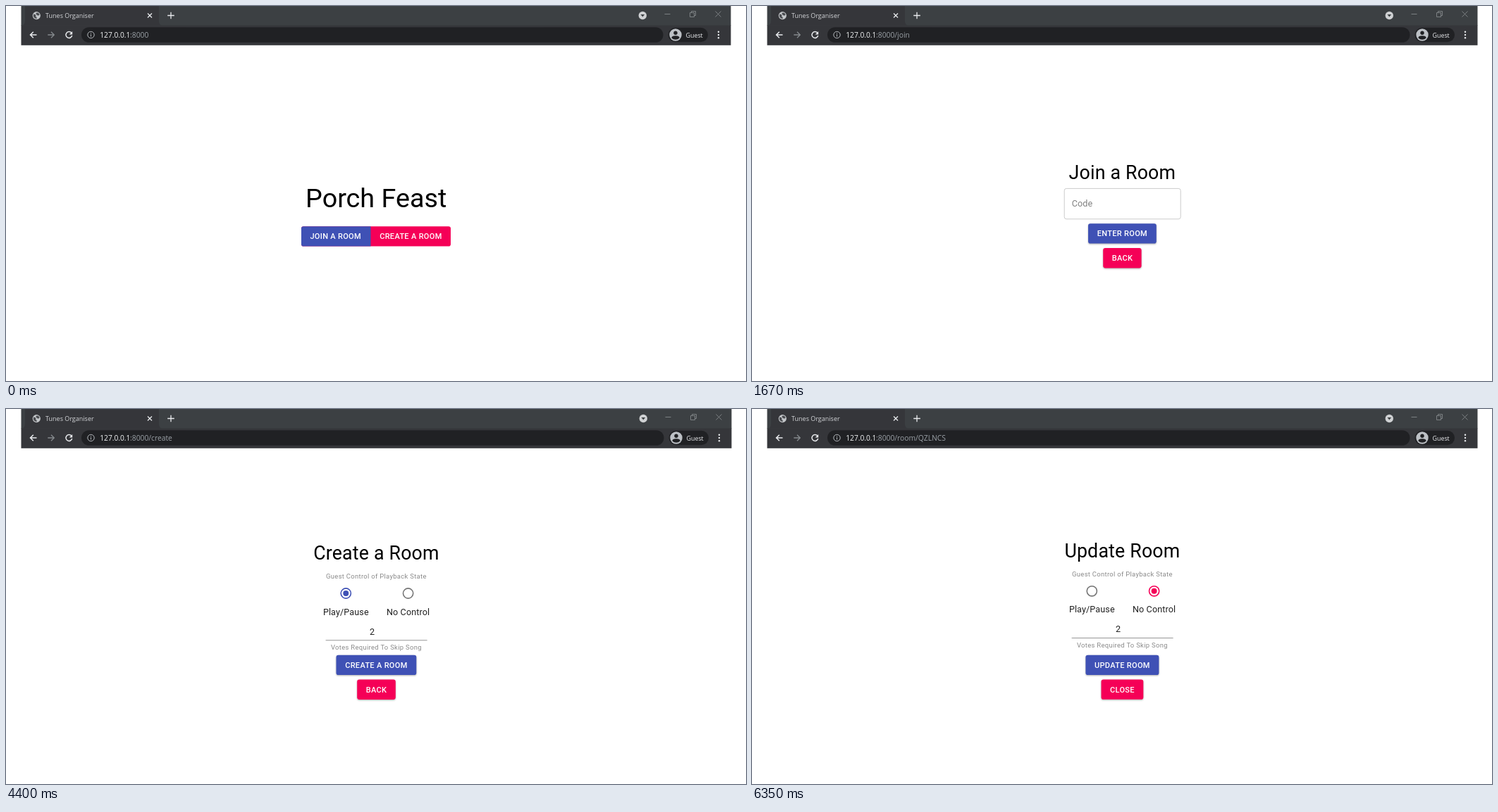
Animation of 1050 by 533 pixels, one loop 8000 ms. Source, as an HTML page:

```html
<!DOCTYPE html>
<html lang="en">
<head>
<meta charset="utf-8">
<title>Tunes Organiser</title>
<style>
  html, body { margin: 0; width: 100%; height: 100%; overflow: hidden; background: #fff; }
  svg { display: block; width: 100vw; height: 100vh; }
  text { font-family: Roboto, sans-serif; white-space: pre; }
  .mid { text-anchor: middle; }
  .ui { font-family: "Open Sans", "Noto Sans", sans-serif; }
  .title { font-size: 26.72px; letter-spacing: .00735em; }
  .body { font-size: 12.57px; letter-spacing: .00938em; fill: #212121; }
  .note { font-size: 9.43px; letter-spacing: .03333em; fill: #8a8a8a; }
  .label { font-size: 11px; font-weight: 500; letter-spacing: .02857em; fill: #fff; }
  .raised { filter: drop-shadow(0 1px 1px rgba(0,0,0,.32)); }
  .line { fill: none; stroke: #e8eaed; stroke-width: 1.3; }
  .scene { visibility: hidden; }
  .scene.on { visibility: visible; }
</style>
</head>
<body>
<svg id="stage" viewBox="0 0 1050 533" preserveAspectRatio="none"></svg>
<script>
const BLUE = '#3f51b5', PINK = '#f50057', LOOP = 8000;

const text = (x, y, cls, str, extra = '') =>
  `<text x="${x}" y="${y}" class="${cls}" ${extra}>${str}</text>`;
const rect = (x, y, w, h, fill, r = 0, extra = '') =>
  `<rect x="${x}" y="${y}" width="${w}" height="${h}" rx="${r}" fill="${fill}" ${extra}/>`;
const dot = (x, y, r, fill, extra = '') =>
  `<circle cx="${x}" cy="${y}" r="${r}" fill="${fill}" ${extra}/>`;
const path = (d, extra = '') => `<path class="line" d="${d}" ${extra}/>`;
const shift = (dx, body) => `<g transform="translate(${dx} 0)">${body}</g>`;

function button(x, y, w, str, fill) {
  return rect(x, y, w, 28.3, fill, 3.1, 'class="raised"') +
    text(x + w / 2, y + 18.1, 'label mid', str);
}

function radio(x, y, color) {
  return dot(x, y, 7.1, 'none', `stroke="${color || '#757575'}" stroke-width="1.57"`) +
    (color ? dot(x, y, 4, color) : '');
}

// Browser bar: left and right edges, then offsets for the items at each side
function bar(left, right, dl, dr, route) {
  const grey = 'style="stroke:#84888b;stroke-width:.9"';
  const tab = `<path fill="#35363a" d="M21.5 27.5Q27 27.5 27 21.500V0H217V21.500Q217 27.500 222.500 27.500Z"/>`;
  const globe = dot(43.3, 13.6, 5.6, '#c3c6c9') +
    '<path fill="#4a4c50" d="M39 11.500l2.400 .500 1.200 1.600-.5 1.500 1.400 1 .2 2.100q-3.800-.3-4.900-3.700zM43 9.400l3 .4 1.700 2.500-1.700 1.500-2-.8-1.700-1.700z"/>';
  const leftItems = globe +
    text(56, 17, 'ui', 'Tunes Organiser', 'font-size="9" fill="#d3d5d8"') +
    path('M201 10.500l6 6m0-6l-6 6') +
    path('M229.200 13.500h9.600M234 8.700v9.600') +
    path('M43.500 41H34.500m4.300-4.300L34.500 41l4.300 4.300', 'style="stroke-width:1.5"') +
    path('M59.300 41h9m-4.300-4.300L68.300 41 64 45.300', 'style="stroke:#85898d"') +
    path('M92.900 38.300A4.400 4.400 0 1 0 93.700 42', 'style="stroke-width:1.5"') +
    '<path fill="#e8eaed" d="M94.200 36v4.500h-4.500z"/>' +
    text(133.300, 45, 'ui', '127.0.0.1', 'font-size="10.200" fill="#f1f3f4"') +
    text(176, 45, 'ui', ':8000' + route, 'font-size="10.300" fill="#9aa0a6"');
  const info = dot(120.500, 41, 4.700, 'none', 'stroke="#b4b8bc"') +
    path('M120.500 40.300v3.300M120.500 38.200v1.100', 'style="stroke:#b4b8bc;stroke-width:1"');
  const rightItems =
    dot(903.300, 13.500, 5.700, '#cfd1d3') +
    '<path fill="#3c4043" d="M900.500 12h5.600l-2.800 3.400z"/>' +
    path('M934.500 11.500h8', grey) +
    path('M970.500 9.500h6v6h-6zM972.500 9.500v-2h6v6h-2', grey) +
    path('M1006.500 7.500l8 8m0-8l-8 8', grey) +
    rect(939.500, 30.700, 56.500, 20.500, '#202124', 10.200) +
    dot(950, 41, 8.700, '#bdc1c6') +
    dot(950, 38.200, 2.700, '#202124') +
    '<path fill="#202124" d="M944.400 45.500q0-3.200 5.600-3.200t5.600 3.200q-2.200 2.300-5.600 2.300t-5.600-2.300z"/>' +
    text(964.500, 44.600, 'ui', 'Guest', 'font-size="8.900" fill="#e8eaed"') +
    [36.800, 41, 45.200].map(y => dot(1011, y, 1.200, '#e8eaed')).join('');
  return rect(left, 0, right - left, 28, '#3c4043') +
    rect(left, 27.500, right - left, 28.300, '#35363a') +
    shift(dl, tab) +
    rect(107 + dl, 30.200, 825.500 + dr - dl, 21.600, '#202124', 10.800) +
    shift(dl, leftItems + info) + shift(dr, rightItems);
}

const home =
  text(525.200, 286, 'mid', 'Porch Feast', 'font-size="37.720"') +
  rect(419, 313.200, 212, 28.300, PINK, 3.100) +
  `<path fill="${BLUE}" d="M517.500 313.200H422.100q-3.100 0-3.100 3.100v22.100q0 3.100 3.100 3.100H517.500z"/>` +
  text(467.700, 331.300, 'label mid', 'JOIN A ROOM') +
  text(574.400, 331.300, 'label mid', 'CREATE A ROOM');

const join =
  text(525.400, 245.500, 'title mid', 'Join a Room') +
  rect(443.200, 259.400, 165, 43.400, '#fff', 3, 'stroke="#c6c6c6" stroke-width=".9"') +
  text(453.700, 285.400, 'body', 'Code', 'style="fill:#808080"') +
  button(477, 309.300, 96.800, 'ENTER ROOM', BLUE) +
  button(498.200, 344.100, 54.400, 'BACK', PINK);

// Room form; y is the height of the radio buttons
function form(cx, y, title, guestOn, buttons) {
  return text(cx, y - 47.700, 'title mid', title) +
    text(cx, y - 21, 'note mid', 'Guest Control of Playback State') +
    radio(cx - 43.100, y, guestOn && BLUE) +
    radio(cx + 45.200, y, !guestOn && PINK) +
    text(cx - 43.100, y + 30.600, 'body mid', 'Play/Pause') +
    text(cx + 45.200, y + 30.600, 'body mid', 'No Control') +
    text(cx - 5.800, y + 58.500, 'body mid', '2') +
    rect(cx - 71.800, y + 66.300, 144, .9, '#8c8c8c') +
    text(cx, y + 80, 'note mid', 'Votes Required To Skip Song') + buttons;
}

const createButtons = (x, y) =>
  button(x - 57, y, 113.800, 'CREATE A ROOM', BLUE) +
  button(x - 27.300, y + 34.800, 54.600, 'BACK', PINK);
const updateButtons =
  button(473.400, 349.800, 104, 'UPDATE ROOM', BLUE) +
  button(495.500, 384.500, 59.800, 'CLOSE', PINK);

const wide = route => bar(21.500, 1029.500, 0, 1, route);
const scenes = [
  [0, bar(21.500, 1028.500, 0, 0, '') + home],
  [500, wide('/join') + join],
  [2450, bar(20, 1030.500, -1.500, 1.800, '/create') +
    form(525, 262.500, 'Create a Room', false, createButtons(525, 350.500))],
  [4400, wide('/create') +
    form(525.400, 262, 'Create a Room', true, createButtons(525.500, 349.800))],
  [6350, wide('/room/QZLNCS') +
    form(525.400, 258.800, 'Update Room', false, updateButtons)]
];

const stage = document.getElementById('stage');
stage.innerHTML = scenes.map(([, body]) => `<g class="scene">${body}</g>`).join('');
const groups = [...stage.children];
const start = performance.now();

function draw() {
  const t = (performance.now() - start) % LOOP;
  const now = scenes.findLastIndex(([from]) => t >= from);
  groups.forEach((g, i) => g.classList.toggle('on', i === now));
  requestAnimationFrame(draw);
}
draw();
</script>
</body>
</html>
```
